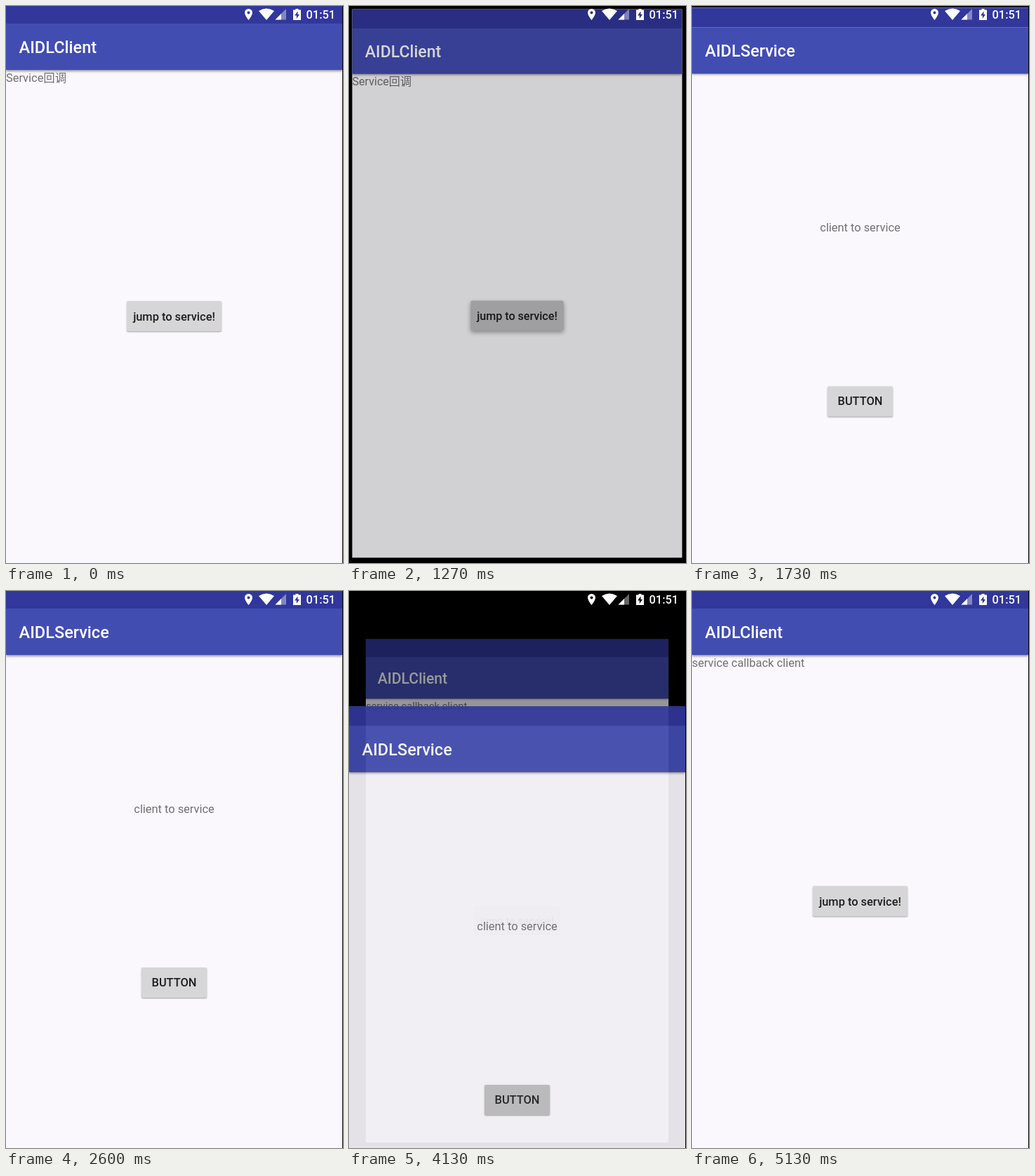
Animation of 480x793 px, one loop 5.27 s. Source, as an HTML page:

```html
<!DOCTYPE html>
<html lang="en">
<head>
<meta charset="utf-8">
<title>Activity transition</title>
<style>
  html, body { margin: 0; width: 100%; height: 100%; overflow: hidden; background: #000; }
  #stage {
    position: relative; width: 480px; height: 793px; overflow: hidden; background: #000;
    font: 16.4px/20px Roboto, "Noto Sans CJK SC", "Noto Sans CJK", sans-serif;
  }
  .page {
    position: absolute; left: 0; top: -3px; width: 479px; height: 796px;
    overflow: hidden; background: #faf8fc;
  }
  .page > * { position: absolute; white-space: nowrap; }
  .status { left: 0; top: 0; width: 100%; height: 28px; background: #31379b; z-index: 1; }
  .bar {
    left: 0; top: 28px; width: 100%; height: 66px; background: #424db2;
    box-shadow: 0 2px 3px rgba(0, 0, 0, .4);
  }
  .title { left: 18.6px; top: 48px; font-size: 23.5px; line-height: 28px; font-weight: 500; color: #fff; }
  .label { color: #706f72; }
  .button {
    --press: 0; --lift: 0;
    --tone: calc(214 - 24 * var(--press));
    height: 43px; line-height: 43px; border-radius: 2px;
    text-align: center; font-weight: 500; color: #1d1d1e;
    background: rgb(var(--tone), var(--tone), calc(var(--tone) + 2));
    box-shadow: 0 calc(1px + 2px * var(--lift)) calc(2px + 4px * var(--lift)) rgba(0, 0, 0, .36);
  }
  #callback { left: 0; top: 96px; }
  #jump { left: 172px; top: 423px; width: 135px; line-height: 45px; }
  #hint { left: 0; top: 303.5px; width: 100%; text-align: center; }
  #reply { left: 193px; top: 538.5px; width: 93px; }
  #preview { left: 0; top: 28px; width: 100%; bottom: 0; background: #faf8fc; }
  #icons { position: absolute; left: 0; top: 0; }
</style>
</head>
<body>
<div id="stage">
  <div class="page" id="client">
    <div class="status"></div>
    <div class="bar"></div>
    <div class="title">AIDLClient</div>
    <div class="label" id="callback"></div>
    <div class="button" id="jump">jump to service!</div>
  </div>
  <div class="page" id="service">
    <div class="status"></div>
    <div class="bar"></div>
    <div class="title">AIDLService</div>
    <div class="label" id="hint">client to service</div>
    <div class="button" id="reply">BUTTON</div>
    <div id="preview"></div>
  </div>
  <svg id="icons" width="480" height="28" fill="#fff" fill-rule="evenodd">
    <path d="M345.5 20C345.5 20 340 13 340 9.4A5.5 5.5 0 0 1 351 9.4C351 13 345.5 20 345.5 20ZM345.5 7.4a2 2 0 1 0 .01 0Z"/>
    <path d="M371 20L360 7Q371 0 382 7Z"/>
    <path d="M399 4V19.5H383.5Z" opacity=".4"/>
    <path d="M392 11V19.5H383.5Z"/>
    <path d="M412.5 4h4v1.5h3.5V20h-11V5.5h3.5ZM415.5 7.5L411 13.5H413.8V18L418 12H415.5Z"/>
    <text x="427.5" y="18" font-size="16.4" font-weight="500">01:51</text>
  </svg>
</div>
<script>
const LOOP = 5270, STEP = 200 / 3;
const OPEN = 1467, CLOSE = 3834, SLIDE = 417, FADE = 167;
const TRAVEL = 876, DROP = 43.2;

const [client, service, callback, jump, reply, preview] =
  ['client', 'service', 'callback', 'jump', 'reply', 'preview'].map(id => document.getElementById(id));

const accelerate = power => x => x ** power;
const decelerate = power => x => 1 - (1 - x) ** power;
const linear = x => x;

// cubic-bezier(.4, 0, .2, 1)
function fastOutSlowIn(x) {
  let low = 0, high = 1, u = .5;
  for (let i = 0; i < 24; i++) {
    u = (low + high) / 2;
    const guess = 1.2 * (1 - u) ** 2 * u + .6 * (1 - u) * u * u + u ** 3;
    if (guess < x) low = u; else high = u;
  }
  return 3 * (1 - u) * u * u + u ** 3;
}

const ramp = (t, start, duration, ease = linear) =>
  ease(Math.min(1, Math.max(0, (t - start) / duration)));

function drawClient(t) {
  const shrink = ramp(t, 1175, 400, fastOutSlowIn) - ramp(t, 4126, 400, fastOutSlowIn);
  const drop = ramp(t, 1267, 240, accelerate(2)) - ramp(t, 4100, 240, decelerate(2));
  const dim = ramp(t, 1160, 267) - ramp(t, 4400, 330);
  const covered = t > OPEN + SLIDE && t < CLOSE;
  client.style.transform = `translateY(${DROP * drop}px) scale(${1 - .1 * shrink})`;
  client.style.opacity = covered ? 0 : 1 - .4 * dim;
  callback.textContent = t < 3000 ? 'Service回调' : 'service callback client';

  const press = t < 2000 ? ramp(t, 930, 140) : 0;
  jump.style.setProperty('--press', press);
  jump.style.setProperty('--lift', press);
}

function drawService(t) {
  const away = 1 - ramp(t, OPEN, SLIDE, decelerate(5)) + ramp(t, CLOSE, SLIDE, accelerate(5));
  service.style.transform = `translateY(${TRAVEL * away}px)`;
  service.style.opacity = ramp(t, 1460, FADE, decelerate(4)) - ramp(t, 4043, FADE, accelerate(4));
  preview.style.opacity = 1 - ramp(t, 1446, 160, decelerate(2));
  reply.style.setProperty('--press', ramp(t, 3560, 160));
}

const start = performance.now();

function tick() {
  const elapsed = (performance.now() - start) % LOOP;
  const t = Math.floor((elapsed + 3.4) / STEP) * STEP;
  drawClient(t);
  drawService(t);
  requestAnimationFrame(tick);
}
tick();
</script>
</body>
</html>
```
